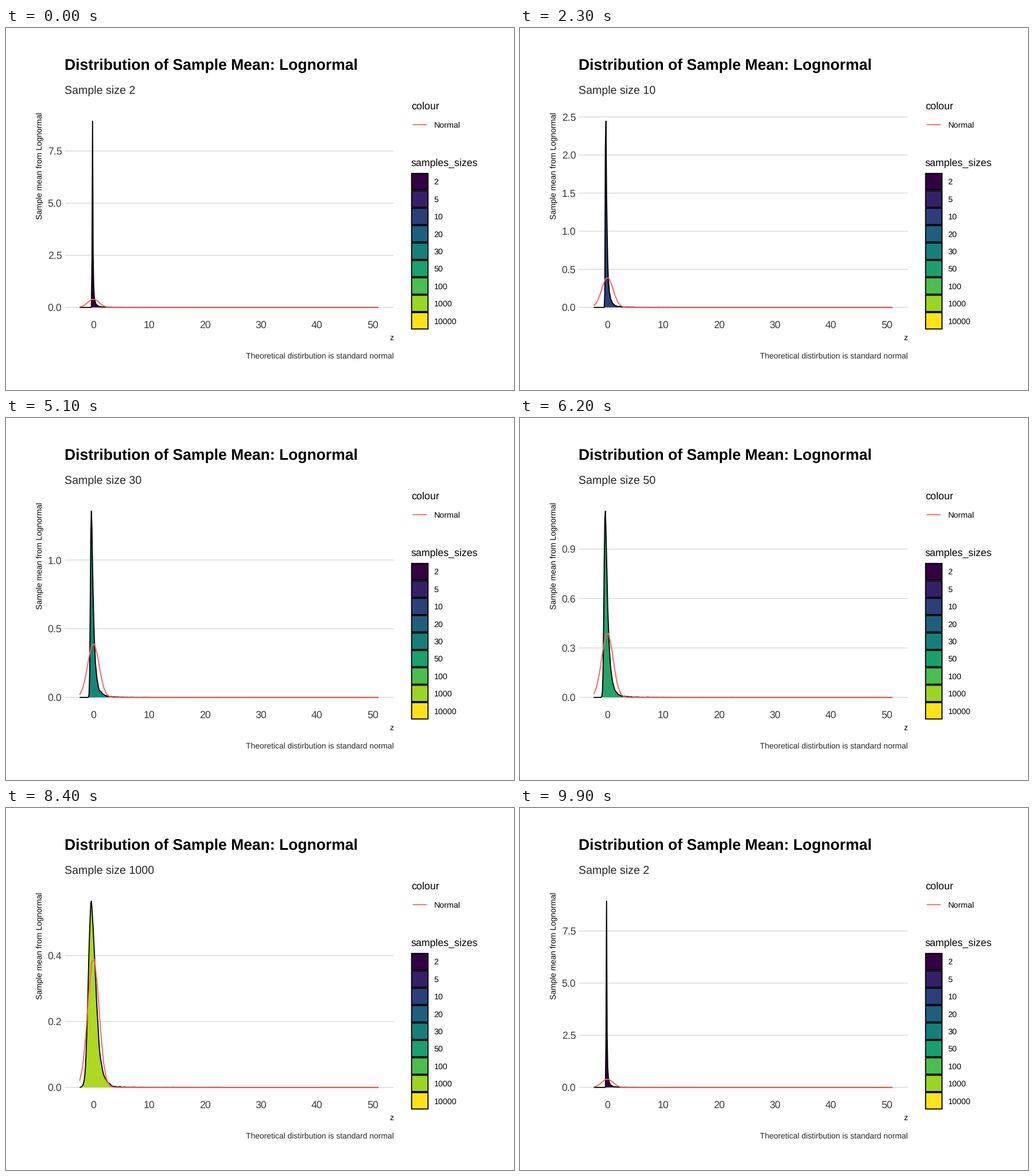
Animation of 885x632 px, one loop 10 s. Source, as a matplotlib script:

```python
import itertools

import matplotlib.pyplot as plt
import numpy as np
from matplotlib.animation import FuncAnimation
from matplotlib.colors import to_rgb
from matplotlib.patches import Rectangle

W, H, DPI = 885, 632, 100
PX = 72 / DPI  # points per pixel

SIZES = [2, 5, 10, 20, 30, 50, 100, 1000, 10000]
PEAKS = [8.93, 4.255, 2.445, 1.636, 1.40, 1.178, 0.94, 0.588, 0.485]
STARTS = [6, 18, 30, 41, 51, 62, 73, 84, 95]  # first moving frame
STEPS = [6, 6, 5, 5, 5, 5, 5, 5, 5]
FRAMES = 100

LEFT, RIGHT, BASE, TOP = 102.5, 675.5, 487.8, 162.6
X0, XUNIT = 152.2, 9.73
Z_MIN, Z_MAX = -2.45, 51.05


def tone(color):
    return tuple(np.asarray(to_rgb(color)) ** 1.22)


VIRIDIS = ["#440154", "#472D7B", "#3B528B", "#2C728E", "#21908C",
           "#27AD81", "#5DC863", "#AADC32", "#FDE725"]
RED = tone("#F8766D")
AXIS_GREY = tone("#4D4D4D")


def sample_means(rng, n, count=10000, block=500):
    """Standardised means of n lognormal draws with log-sd 2."""
    total = np.zeros(count)
    left = n
    while left:
        m = min(left, block)
        draws = rng.standard_normal((count, m), dtype=np.float32)
        draws *= 2
        total += np.exp(draws, out=draws).sum(axis=1)
        left -= m
    mean, sd = np.exp(2), np.exp(2) * np.sqrt(np.exp(4) - 1)
    return (total / n - mean) / (sd / np.sqrt(n))


def density(z, grid):
    """Kernel density of linearly binned samples."""
    q1, q3 = np.percentile(z, [25, 75])
    bw = 0.9 * min(z.std(), (q3 - q1) / 1.34) * len(z) ** -0.2
    step = grid[1] - grid[0]
    pos = (z[(z > grid[0]) & (z < grid[-1])] - grid[0]) / step
    cell = pos.astype(int)
    frac = pos - cell
    size = len(grid)
    mass = (np.bincount(cell, 1 - frac, size + 1)
            + np.bincount(cell + 1, frac, size + 1))[:size]
    u = (grid[:, None] - grid[None, :]) / bw
    return np.exp(-0.5 * u * u) @ mass


def breaks(lo, hi, m=5):
    """Pleasant tick positions (extended Wilkinson scoring)."""
    span = hi - lo
    z0 = int(np.floor(np.log10(span)))
    best, ticks = -9, []
    nice = enumerate([1, 5, 2, 2.5, 4, 3])
    for (i, q), k, z in itertools.product(nice, range(2, 11), range(z0 - 2, z0 + 2)):
        step = q * 10.0 ** z
        for first in range(-2, 2):
            a = first * step
            b = a + step * (k - 1)
            simple = 1 - i / 5 + (a <= 0 <= b)
            cover = 1 - 0.5 * ((hi - b) ** 2 + (lo - a) ** 2) / (0.1 * span) ** 2
            r = (k - 1) / (b - a)
            rt = (m - 1) / (max(b, hi) - min(a, lo))
            dense = 2 - max(r / rt, rt / r)
            score = 0.25 * simple + 0.2 * cover + 0.5 * dense
            if score > best:
                best, ticks = score, a + step * np.arange(k)
    return [t for t in ticks if lo <= t <= hi]


def decimals(ticks):
    return next(d for d in range(6)
                if all(abs(round(t, d) - t) < 1e-9 for t in ticks))


rng = np.random.default_rng(7)
grid = np.linspace(Z_MIN, Z_MAX, 512)
curves = []
for n, peak in zip(SIZES, PEAKS):
    d = density(sample_means(rng, n), grid)
    curves.append(d * peak / d.max())

grid_px = X0 + XUNIT * grid
norm_z = np.linspace(Z_MIN, Z_MAX, 101)
norm_px = X0 + XUNIT * norm_z
norm_y = np.exp(-norm_z ** 2 / 2) / np.sqrt(2 * np.pi)

plt.rcParams["font.family"] = "Liberation Sans"
plt.rcParams["text.hinting"] = "none"
fig = plt.figure(figsize=(W / DPI, H / DPI), dpi=DPI, facecolor="white")
ax = fig.add_axes([0, 0, 1, 1])
ax.set_xlim(0, W)
ax.set_ylim(H, 0)
ax.axis("off")


def label(x, mid, s, size, color="black", **kw):
    """Text whose capitals are centred on height mid."""
    return ax.text(x, mid + 0.344 * size, s, fontsize=size * PX, color=color,
                   va="baseline", **kw)


def stroke(xs, ys, color, width, z):
    return ax.plot(xs, ys, color=color, lw=width * PX, zorder=z, snap=False,
                   solid_capstyle="butt", solid_joinstyle="round")[0]


label(102, 64.3, "Distribution of Sample Mean: Lognormal", 26.5, weight="bold")
subtitle = label(102, 108, "", 19.6, "#262626")
label(675.5, 572, "Theoretical distirbution is standard normal", 13.95,
      "#262626", ha="right")
label(675.5, 540.3, "z", 14, ha="right")
ax.text(63.5, 147, "Sample mean from Lognormal", fontsize=13.9 * PX,
        rotation=90, ha="right", va="baseline", rotation_mode="anchor")
for v in range(0, 51, 10):
    label(X0 + XUNIT * v, 517.3, str(v), 17.8, AXIS_GREY, ha="center")

# Legend
label(706, 135.5, "colour", 17.9)
stroke([708.5, 733], [168.7, 168.7], RED, 1.8, 3)
label(745.5, 169.3, "Normal", 14.2)
label(706, 234.5, "samples_sizes", 17.7)
for i, (n, color) in enumerate(zip(SIZES, VIRIDIS)):
    mid = 268.2 + 30.37 * i
    ax.add_patch(Rectangle((706.6, mid - 14.3), 28.6, 28.6, fc=tone(color),
                           ec="black", lw=1.9 * PX, snap=False))
    label(745.5, mid + 0.4, str(n), 14.2)

# Moving parts
rules = [stroke([LEFT, RIGHT], [0, 0], "#d2d2d2", 1.2, 1) for _ in range(9)]
marks = [label(97.3, 0, "", 17.8, AXIS_GREY, ha="right") for _ in rules]
area, = ax.fill(grid_px, grid_px, lw=0, zorder=2)
outline = stroke(grid_px, grid_px, "black", 1.9, 3)
normal = stroke(norm_px, norm_px, RED, 1.9, 4)


def phase(frame):
    """State left, state entered and progress between them."""
    passed = [k for k, s in enumerate(STARTS) if s <= frame]
    if not passed:
        return 0, 0, 0.0
    k = passed[-1]
    t = min(1.0, (frame - STARTS[k] + 1) / STEPS[k])
    return k, (k + 1) % len(SIZES), t


def update(frame):
    a, b, t = phase(frame)
    y = (1 - t) * curves[a] + t * curves[b]
    top = y.max()
    unit = (BASE - TOP) / top

    ticks = breaks(-0.05 * top, 1.05 * top)
    places = decimals(ticks)
    for i, (rule, mark) in enumerate(zip(rules, marks)):
        shown = i < len(ticks)
        rule.set_visible(shown)
        mark.set_visible(shown)
        if shown:
            h = BASE - unit * ticks[i]
            rule.set_ydata([h, h])
            mark.set_y(h + 0.344 * 17.8 + 0.3)
            mark.set_text(f"{abs(ticks[i]):.{places}f}")

    h = BASE - unit * y
    outline.set_ydata(h)
    area.set_xy(np.column_stack([np.r_[grid_px, grid_px[-1], grid_px[0]],
                                 np.r_[h, BASE, BASE]]))
    mix = (1 - t) * np.array(to_rgb(VIRIDIS[a])) + t * np.array(to_rgb(VIRIDIS[b]))
    area.set_facecolor(tone(mix))
    normal.set_ydata(BASE - unit * norm_y)
    subtitle.set_text(f"Sample size {SIZES[b if t >= 0.5 else a]}")
    return [*rules, *marks, area, outline, normal, subtitle]


anim = FuncAnimation(fig, update, frames=FRAMES, interval=100,
                     init_func=lambda: update(0), repeat=True, repeat_delay=0)
plt.show()
```
